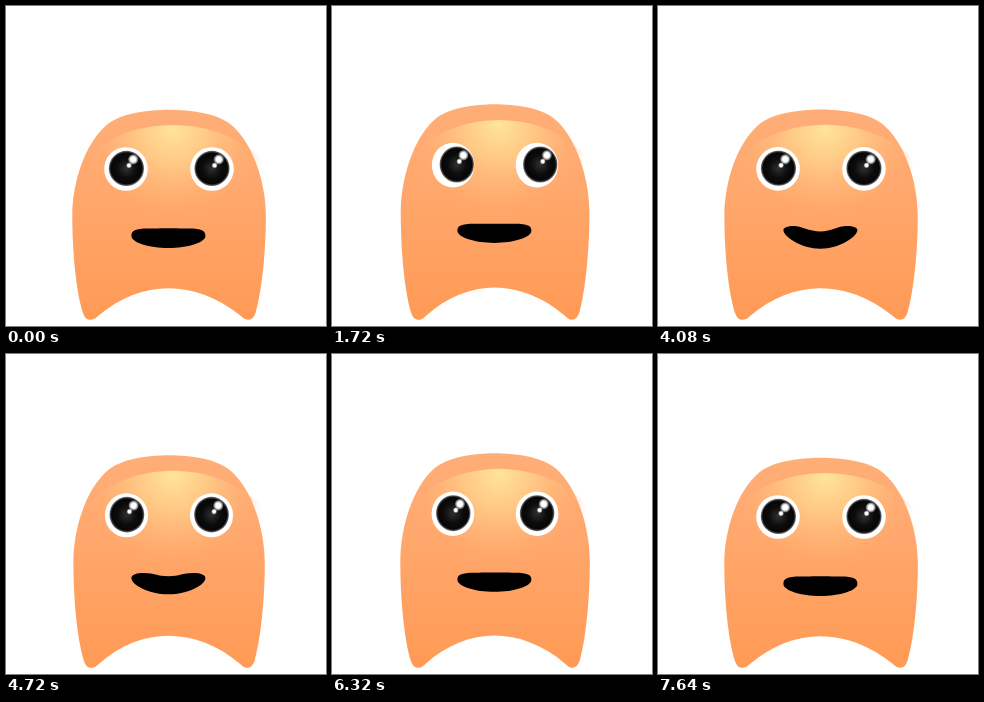
These frames come from a looping animation (320x320 px, 7.68 s). An HTML page:

```html
<!DOCTYPE html>
<html lang="en">
<head>
<meta charset="utf-8">
<title>Breathing blob</title>
<style>
  html, body { margin: 0; width: 100%; height: 100%; overflow: hidden; background: #fff; }
  svg { display: block; width: 100vw; height: 100vh; }
</style>
</head>
<body>
<svg viewBox="0 0 320 320">
  <defs>
    <linearGradient id="skin" x1="0" y1="0" x2="0" y2="1">
      <stop offset="0" stop-color="#ffae78"/>
      <stop offset=".4" stop-color="#ffa76c"/>
      <stop offset="1" stop-color="#ff9a55"/>
    </linearGradient>
    <radialGradient id="glow" gradientUnits="userSpaceOnUse" cx="167" cy="123" r="96">
      <stop offset="0" stop-color="#ffe49a"/>
      <stop offset=".35" stop-color="#ffd08a" stop-opacity=".85"/>
      <stop offset=".7" stop-color="#ffba7a" stop-opacity=".45"/>
      <stop offset="1" stop-color="#ffa86c" stop-opacity="0"/>
    </radialGradient>
    <radialGradient id="iris">
      <stop offset="0" stop-color="#303030"/>
      <stop offset=".55" stop-color="#0c0c0c"/>
      <stop offset=".88" stop-color="#060606"/>
      <stop offset="1" stop-color="#777"/>
    </radialGradient>
    <radialGradient id="shine">
      <stop offset=".5" stop-color="#fff"/>
      <stop offset="1" stop-color="#fff" stop-opacity=".2"/>
    </radialGradient>
    <g id="pupil">
      <circle r="17.6" fill="url(#iris)"/>
      <circle cx="6.8" cy="-9" r="5.2" fill="url(#shine)"/>
      <circle cx="2.6" cy="-3" r="2.8" fill="url(#shine)"/>
    </g>
  </defs>
  <g id="body">
    <path fill="url(#skin)" d="M66.3 210C66.3 176 79 138 100 119.5C114 107 142 103.7 163 103.7S212 107 226 119.5C247 138 259.9 176 259.9 210C259.9 245 256 285 249.5 307C246.5 315 241 316 235 310C212 291 186 282.2 162.500 282.2S114 291 92 310C86 316 79.5 315 77 307C70 285 66.3 245 66.3 210Z"/>
    <ellipse cx="167" cy="199" rx="108" ry="80" fill="url(#glow)"/>
    <g fill="#fff">
      <circle cx="120" cy="163" r="21.8"/>
      <circle cx="206" cy="163" r="21.8"/>
    </g>
    <g id="gaze">
      <use href="#pupil" x="120.4" y="162.4"/>
      <use href="#pupil" x="206" y="162.4"/>
    </g>
    <path id="mouth"/>
  </g>
</svg>
<script>
const LOOP = 7680, STEP = 40;
const [body, gaze, mouth] = ['body', 'gaze', 'mouth'].map(id => document.getElementById(id));

// Eased glance that peaks around the given time
function glance(t, center) {
  const x = Math.min(1, Math.max(0, (720 - Math.abs(t - center)) / 480));
  return x * x * (3 - 2 * x);
}

function mouthPath(breath, smile) {
  const halfWidth = 37 + breath;
  const corner = 230 - 3 * breath - 6 * smile;
  const shoulder = 222.6 - 2.4 * breath - 2.4 * smile;
  const top = 222.3 - 2.2 * breath + 3.5 * smile;
  const bottom = 242 - 3.2 * breath + smile;
  const bend = .55 + .17 * smile;
  const low = corner + 6.5;
  const p = (f, y) => `${(162.4 + f * halfWidth).toFixed(2)} ${y.toFixed(2)} `;
  return `M${p(-1, corner)}
    C${p(-1, shoulder + 2)}${p(-.9, shoulder)}${p(-bend, shoulder)}
    S${p(-.3, top)}${p(0, top)}
    S${p(bend - .25, shoulder)}${p(bend, shoulder)}
    C${p(.9, shoulder)}${p(1, shoulder + 2)}${p(1, corner)}
    C${p(1, low)}${p(.52, bottom)}${p(0, bottom)}
    S${p(-1, low)}${p(-1, corner)}Z`;
}

function render(t) {
  const turn = 2 * Math.PI * t / LOOP;
  const breath = (1 - Math.cos(2 * turn)) / 2;
  const smile = Math.max(0, -Math.cos(turn)) ** 2;
  const look = 3.4 * glance(t, 1800) - 3.9 * glance(t, 2840);
  body.setAttribute('transform',
    `translate(163 314) scale(${1 - .026 * breath} ${1 + .0266 * breath}) translate(-163 -314)`);
  gaze.setAttribute('transform', `translate(${look} 0)`);
  mouth.setAttribute('d', mouthPath(breath, smile));
}

const start = performance.now();
function tick() {
  const t = (performance.now() - start) % LOOP;
  render(Math.floor(t / STEP) * STEP);
  requestAnimationFrame(tick);
}
tick();
</script>
</body>
</html>
```
